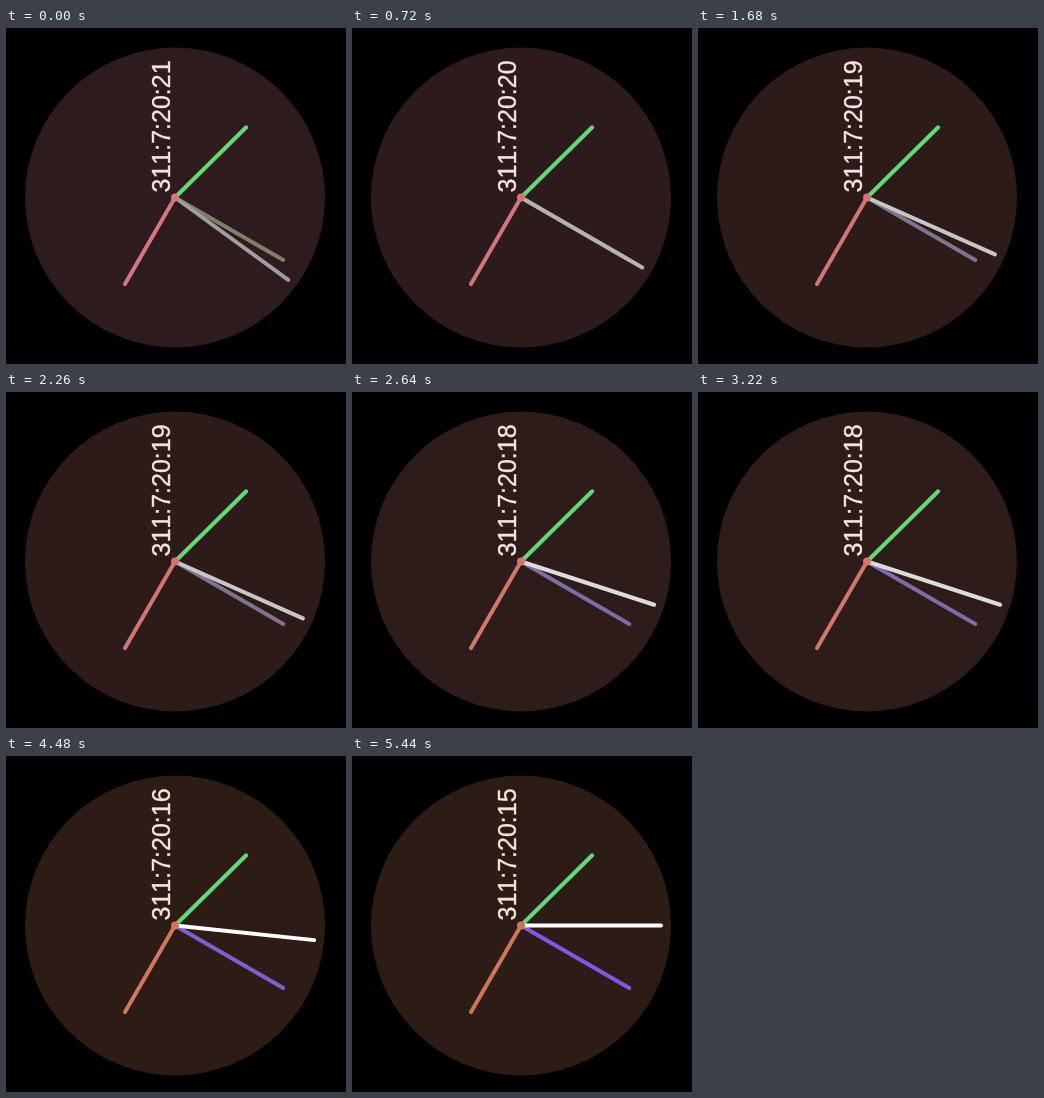
Recreate the animation shown at these times as an HTML page. Size 340 by 336 pixels, loop 5520 ms.

```html
<!DOCTYPE html>
<html lang="en">
<head>
<meta charset="utf-8">
<title>Countdown clock</title>
<style>
  html, body { margin: 0; width: 100%; height: 100%; overflow: hidden; background: #000; }
  svg { display: block; width: 340px; height: 336px; }
  line { stroke-width: 4; stroke-linecap: round; }
  text {
    font: 25px "Liberation Sans", Arial, Helvetica, sans-serif;
    font-kerning: none;
    stroke-width: .4;
    white-space: pre;
  }
</style>
</head>
<body>
<svg viewBox="0 0 340 336">
  <g transform="translate(169 169.5)">
    <circle id="face" r="150"/>
    <text id="label" transform="rotate(-90)" x="5" y="-5"></text>
    <line id="day" x2="100" transform="rotate(-44.6)" stroke="#62d975"/>
    <line id="hour" x2="100" transform="rotate(120)"/>
    <line id="minute" x2="125" transform="rotate(30)"/>
    <line id="second" x2="140"/>
    <circle id="hub" r="4"/>
  </g>
</svg>
<script>
  const LOOP = 5520;
  const TICKS = [720, 1680, 2640, 3600, 4480, 5440];
  const el = id => document.getElementById(id);
  const [face, label, hour, minute, second, hub] =
    ['face', 'label', 'hour', 'minute', 'second', 'hub'].map(el);

  const mix = (a, b, k) =>
    `rgb(${a.map((v, i) => Math.round(v + (b[i] - v) * k)).join()})`;

  let shown = -1;

  function draw(step) {
    const sec = 21 - step;
    const k = step / TICKS.length;
    const warm = mix([213, 117, 127], [208, 118, 88], k);
    const ink = mix([247, 225, 227], [246, 228, 220], k);
    const grey = Math.min(255, Math.round(158 + 20.5 * step));

    face.setAttribute('fill', mix([45, 27, 29], [45, 28, 21], k));
    hour.setAttribute('stroke', warm);
    hub.setAttribute('fill', warm);
    minute.setAttribute('stroke', mix([128, 128, 104], [126, 88, 230], k));
    second.setAttribute('stroke', `rgb(${grey},${grey},${grey})`);
    second.setAttribute('transform', `rotate(${sec * 6 - 90})`);
    label.setAttribute('fill', ink);
    label.setAttribute('stroke', ink);
    label.textContent = `311:7:20:${sec}`;
  }

  function tick() {
    const t = performance.now() % LOOP;
    const step = TICKS.filter(at => t >= at).length;
    if (step !== shown) draw(shown = step);
    requestAnimationFrame(tick);
  }
  tick();
</script>
</body>
</html>
```
